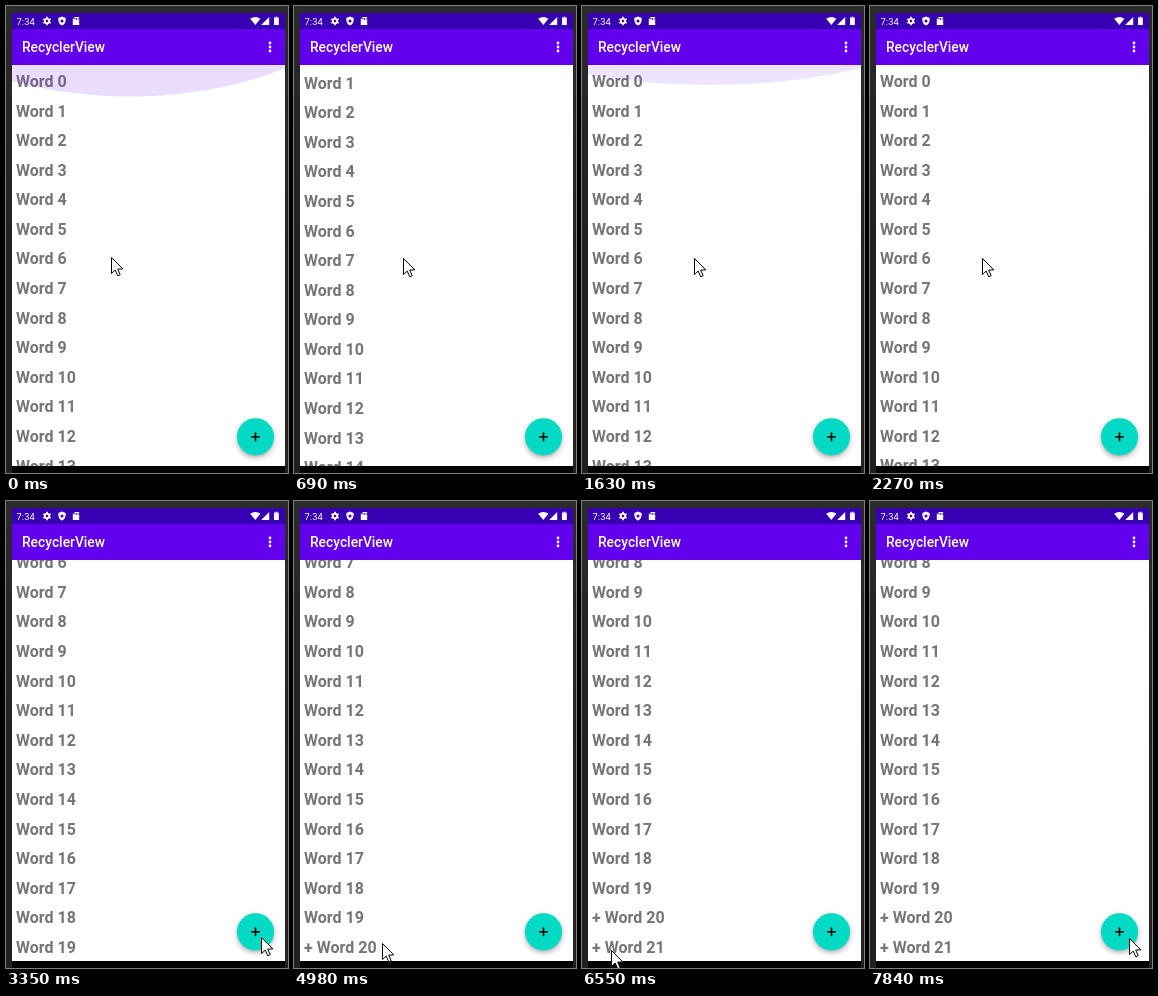
An HTML page with a canvas that plays this animation: 282 by 467 pixels, repeating every 7.99 s.

```html
<!DOCTYPE html>
<html lang="en">
<head>
<meta charset="utf-8">
<title>RecyclerView</title>
<style>
  html, body { margin: 0; width: 100%; height: 100%; overflow: hidden; background: #222; }
  canvas { display: block; width: 282px; height: 467px; }
</style>
</head>
<body>
<canvas id="stage"></canvas>
<script>
const W = 282, H = 467, LOOP = 7990;
const LEFT = 6, TOP = 7, LIST = 59, BOTTOM = 460, WIDTH = 273;
const ROW = 29.58, FIRST = 81, WORDS = 20, END = 191.2;
const SLOWER = 4958;            // the screen refreshes less often from here on
const CLICKS = [4020, 6245];
const FONT = 'Roboto, "Open Sans", sans-serif';
const PURPLE = '#6200ee', INDIGO = '#3700b3', WHITE = '#fff';

const canvas = document.getElementById('stage');
const ctx = canvas.getContext('2d');
const dpr = window.devicePixelRatio || 1;
canvas.width = W * dpr;
canvas.height = H * dpr;

// Pointer moves: start, end, x, y
const MOVES = [
  [0, 1200, 112, 252], [2400, 3350, 255, 436], [4250, 4690, 50, 450],
  [4690, 4958, 88, 442], [4958, 5245, 67, 441], [5245, 5960, 257, 437],
  [6100, 6531, 29, 449], [6531, 7560, 259, 437]
];

function ease(from, to, t) {
  const p = Math.min(1, Math.max(0, (t - from) / (to - from)));
  return p * p * (3 - 2 * p);
}

function pulse(start, length, t) {
  return t < start ? 0 : 1 - ease(start, start + length, t);
}

function refresh(t) {
  const [base, step] = t < SLOWER ? [0, 134] : [SLOWER, 143];
  return base + Math.floor((t - base) / step) * step;
}

function pointer(t) {
  let x = 105, y = 251;
  for (const [from, to, toX, toY] of MOVES) {
    const p = ease(from, to, t);
    x += (toX - x) * p;
    y += (toY - y) * p;
  }
  return [Math.round(x), Math.round(y)];
}

function flung(t) {
  return END * (ease(540, 1080, t) - ease(1210, 1480, t) + ease(2140, 2540, t));
}

function rect(x, y, w, h, color) {
  ctx.fillStyle = color;
  ctx.fillRect(x, y, w, h);
}

function disc(x, y, r, color) {
  ctx.fillStyle = color;
  ctx.beginPath();
  ctx.arc(x, y, r, 0, 7);
  ctx.fill();
}

function poly(points, color) {
  ctx.fillStyle = color;
  ctx.beginPath();
  points.forEach(([x, y]) => ctx.lineTo(x, y));
  ctx.closePath();
  ctx.fill();
}

function text(str, x, y, size, weight, color) {
  ctx.font = `${weight} ${size}px ${FONT}`;
  ctx.fillStyle = color;
  ctx.fillText(str, x, y);
}

function drawFrame() {
  const shade = ctx.createLinearGradient(0, 0, 0, 240);
  shade.addColorStop(0, '#2b2b2b');
  shade.addColorStop(1, '#212121');
  rect(0, 0, W, H, shade);
  rect(LEFT, BOTTOM, WIDTH, H - BOTTOM, '#000');
}

function drawGear(x, y) {
  ctx.strokeStyle = WHITE;
  ctx.lineWidth = 1.7;
  ctx.beginPath();
  for (let a = Math.PI / 6; a < 6.3; a += Math.PI / 3) {
    ctx.moveTo(x, y);
    ctx.lineTo(x + Math.cos(a) * 4.2, y + Math.sin(a) * 4.2);
  }
  ctx.stroke();
  disc(x, y, 3.1, WHITE);
  disc(x, y, 1.3, INDIGO);
}

function drawShield(x, y) {
  ctx.fillStyle = WHITE;
  ctx.beginPath();
  ctx.moveTo(x, y - 4.5);
  ctx.lineTo(x + 3.7, y - 3);
  ctx.quadraticCurveTo(x + 4, y + 3, x, y + 4.5);
  ctx.quadraticCurveTo(x - 4, y + 3, x - 3.7, y - 3);
  ctx.fill();
  disc(x, y, 1.5, INDIGO);
}

function drawStatusIcons() {
  drawGear(41, 15);
  drawShield(56, 15);
  poly([[69, 11], [73.2, 11], [73.2, 19], [66.8, 19], [66.8, 13.4]], WHITE);
  for (let x = 68.6; x < 72; x += 1.6) rect(x, 12, .8, 1.8, INDIGO);

  ctx.fillStyle = WHITE;
  ctx.beginPath();
  ctx.moveTo(249.3, 19);
  ctx.arc(249.3, 19, 8, -Math.PI * .72, -Math.PI * .28);
  ctx.fill();
  poly([[263.2, 11], [263.2, 19], [255.2, 19]], WHITE);
  rect(268, 11.6, 4.8, 7.4, WHITE);
  rect(269.4, 10.7, 2, 1, WHITE);
}

function drawBars() {
  rect(LEFT, TOP, WIDTH, 16, INDIGO);
  rect(LEFT, 23, WIDTH, LIST - 23, PURPLE);
  text('7:34', 10.6, 18.5, 9.4, 400, WHITE);
  drawStatusIcons();
  text('RecyclerView', 16, 46, 13.8, 500, WHITE);
  for (let y = 37; y < 46; y += 4) disc(264, y, 1.4, WHITE);
}

// Overscroll glow: a flattened circle that follows the pointer
function drawGlow(size, edge, dir, x) {
  if (!size) return;
  const r = WIDTH * 1.2, depth = r * (1 - Math.cos(Math.PI / 6));
  ctx.save();
  ctx.translate(142.5 + (x - 142.5) / 2, edge);
  ctx.scale(1, size * dir);
  disc(0, depth - r, r, `rgba(98,0,238,${.06 + .1 * size})`);
  ctx.restore();
}

function drawList(t, x) {
  const added = CLICKS.filter(c => t >= c).length;
  const scroll = flung(t) + added * ROW;
  ctx.save();
  ctx.beginPath();
  ctx.rect(LEFT, LIST, WIDTH, BOTTOM - LIST);
  ctx.clip();
  rect(LEFT, LIST, WIDTH, BOTTOM - LIST, WHITE);
  for (let i = 0; i < WORDS + added; i++) {
    text((i < WORDS ? 'Word ' : '+ Word ') + i, 10, FIRST + i * ROW - scroll, 16, 700, '#757575');
  }
  drawGlow(.72 * pulse(0, 450, t) + .57 * pulse(1480, 450, t), LIST, 1, x);
  drawGlow(.57 * pulse(2540, 450, t), BOTTOM, -1, x);
  ctx.restore();
}

function drawButton(t) {
  const x = 249.5, y = 430.8, r = 18.6;
  ctx.save();
  ctx.shadowColor = 'rgba(0,0,0,.32)';
  ctx.shadowBlur = 5 * dpr;
  ctx.shadowOffsetY = 2.2 * dpr;
  disc(x, y, r, '#03dac5');
  ctx.restore();
  for (const c of CLICKS) disc(x, y, r, `rgba(255,255,255,${.18 * pulse(c, 286, t)})`);
  rect(x - 4.4, y - .8, 8.8, 1.6, '#000');
  rect(x - .8, y - 4.4, 1.6, 8.8, '#000');
}

function drawPointer(x, y) {
  ctx.save();
  ctx.translate(x + .5, y + .5);
  poly([[0, 0], [0, 16], [3.7, 12.6], [6.3, 18.3], [8.7, 17.2], [6.2, 11.6], [11.3, 11.4]], WHITE);
  ctx.strokeStyle = '#000';
  ctx.lineWidth = 1;
  ctx.stroke();
  ctx.restore();
}

function draw(t) {
  const [x, y] = pointer(t);
  ctx.setTransform(dpr, 0, 0, dpr, 0, 0);
  drawFrame();
  drawList(t, x);
  drawBars();
  drawButton(t);
  drawPointer(x, y);
}

const start = performance.now();
function tick() {
  draw(refresh((performance.now() - start) % LOOP));
  requestAnimationFrame(tick);
}
tick();
</script>
</body>
</html>
```
